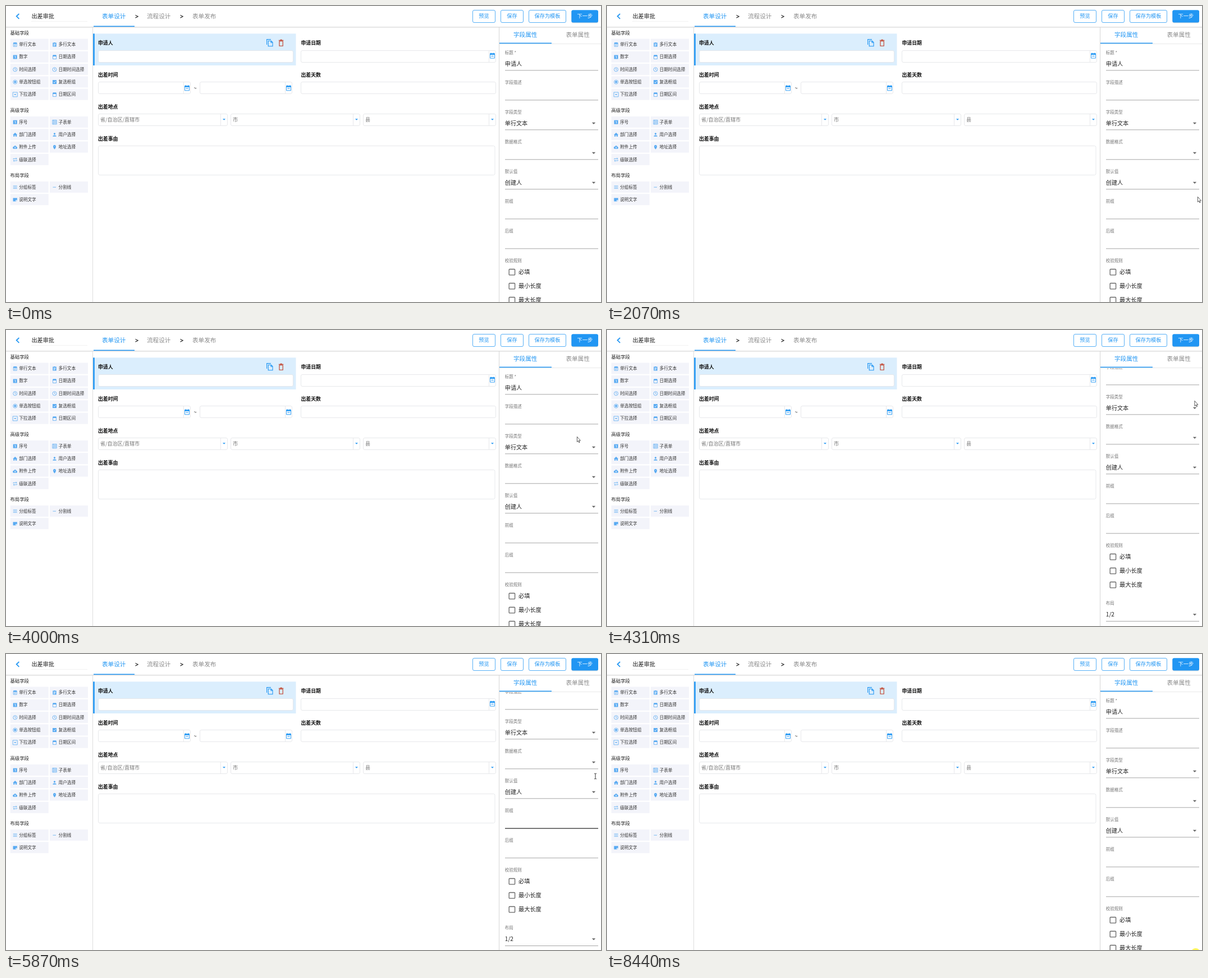
These frames come from a looping animation (1060x528 px, 8.52 s). An HTML page:

```html
<!DOCTYPE html>
<html lang="zh-CN">
<head>
<meta charset="utf-8">
<title>表单设计</title>
<style>
  html, body { margin: 0; width: 100%; height: 100%; overflow: hidden; background: #fff; }
  svg { display: block; width: 1060px; height: 528px; }
  text { font-family: "Noto Sans CJK SC", "Noto Sans CJK", "Noto Sans", sans-serif; white-space: pre; }
</style>
</head>
<body>
<svg id="stage" viewBox="0 0 1060 528"></svg>
<script>
const NS = 'http://www.w3.org/2000/svg';
const BLUE = '#2196f3', ICON = '#58aaf2', INK = '#222', GRAY = '#8c8c8c', EDGE = '#dfe1e5';
const HAIR = .75; // thickness of a thin line
const stage = document.getElementById('stage');

function add(parent, tag, attrs) {
  const el = document.createElementNS(NS, tag);
  for (const k in attrs) el.setAttribute(k, attrs[k]);
  parent.appendChild(el);
  return el;
}
const group = (parent, attrs = {}) => add(parent, 'g', attrs);
const box = (p, x, y, width, height, fill, more = {}) =>
  add(p, 'rect', { x, y, width, height, fill, ...more });
const path = (p, d, fill, more = {}) => add(p, 'path', { d, fill, ...more });
// Text placed by its vertical middle
function label(p, str, x, mid, size, fill = INK, more = {}) {
  add(p, 'text', { x, y: mid + size * 0.37, 'font-size': size, fill, ...more }).textContent = str;
}
const outline = (p, x, y, r, b, stroke = EDGE) =>
  box(p, x + .5, y + .5, r - x, b - y, '#fff', { stroke, 'stroke-width': HAIR, rx: 2.5 });
const triangle = (p, x, y, w, fill) =>
  path(p, `M${x - w} ${y - w / 2}h${2 * w}l${-w} ${w}z`, fill);

// Palette icons, drawn in an 8 x 8 cell
const line = d => g => path(g, d, 'none', { stroke: ICON });
const solid = (d, cut) => g => {
  path(g, d, ICON);
  if (cut) path(g, cut, 'none', { stroke: '#fff', 'stroke-width': .9 });
};
const both = (a, b) => g => { a(g); b(g); };
const frame = line('M1 1.5h6v6h-6z');
const ring = line('M.5 4a3.5 3.5 0 1 0 7 0a3.5 3.5 0 1 0 -7 0');
const calendar = both(frame, solid('M1 .6h1.2v-.6h1v.6h1.6v-.6h1v.6h1.2v2.4h-6z'));
const icons = {
  text: both(calendar, line('M2.5 4.5h3M2.5 6h2')),
  area: solid('M.8 .8h2l1.2-.8l1.2 .8h2v7h-6.4z', 'M2.2 3h3.6M2.2 4.6h3.6M2.2 6.2h2.4'),
  number: solid('M.5 .5h7v7h-7z', 'M3.2 2.4h1.2v3.8'),
  date: calendar,
  clock: both(ring, line('M4 1.8v2.4l1.7 1')),
  radio: both(ring, solid('M2 4a2 2 0 1 0 4 0a2 2 0 1 0 -4 0')),
  check: solid('M.5 .5h7v7h-7z', 'M1.8 4l1.6 1.6l2.9-3.1'),
  drop: both(line('M0 0h8v8h-8z'), solid('M2 3h4l-2 2.3z')),
  table: both(line('M.3 .3h7.4v7.4h-7.4z'), line('M2.2 .5v7M3 2.2h4M3 4h4M3 5.8h4')),
  home: solid('M4 .6L8 4.2H6.9V7.6H4.8V5H3.2V7.6H1.1V4.2H0z'),
  user: solid('M2.4 2.4a1.6 1.6 0 1 0 3.2 0a1.6 1.6 0 1 0 -3.2 0M.8 7.2c0-3 6.4-3 6.4 0z'),
  cloud: solid('M2 7a2 2 0 0 1-.2-4a2.5 2.5 0 0 1 4.7 .5a1.8 1.8 0 0 1 0 3.5z', 'M4 6.2v-2.4M2.9 4.8l1.1-1.1l1.1 1.1'),
  pin: solid('M4 8C-.4 2.8 2 .2 4 .2S8.4 2.8 4 8z', 'M3.6 2.7h.8'),
  loop: line('M.8 3.5v-1.3h6M5.4 .7l1.6 1.5l-1.6 1.5M7.2 4.6v1.3h-6M2.6 4.4l-1.6 1.5l1.6 1.5'),
  lines: line('M.5 1.7h7M.5 4h7M.5 6.3h7'),
  dash: line('M1 4h5.5'),
  note: solid('M.3 1h7.4v3.8l-2 2.2h-5.4z', 'M5.4 6.8v-1.9h2')
};

function drawHeader() {
  const g = group(stage);
  box(g, 0, 0, 1060, 37, '#fff');
  box(g, 0, 37, 1060, 1, '#dcdcdc');
  box(g, 0, 38, 1060, 1, '#f0f0f0');
  path(g, 'M23.3 13.8l-4.6 4.5l4.6 4.5', 'none', { stroke: BLUE, 'stroke-width': 1.8 });
  label(g, '出差审批', 45.5, 18, 10.1);
  box(g, 45, 27, 100, HAIR, '#eeeeee');
  label(g, '表单设计', 171, 18.5, 10.6, BLUE);
  label(g, '流程设计', 251, 18.5, 10.6, GRAY);
  label(g, '表单发布', 332, 18.5, 10.6, GRAY);
  for (const x of [230.5, 310.5])
    path(g, `M${x} 16.3l4.6 2.4l-4.6 2.4`, 'none', { stroke: '#333', 'stroke-width': 1.2 });
  box(g, 156, 35.5, 73, 1.5, BLUE);
  for (const [x, r, s] of [[831, 871, '预览'], [881, 921, '保存'], [931, 997, '保存为模板']]) {
    outline(g, x, 7, r, 29, BLUE);
    label(g, s, (x + r + 1) / 2, 18, 9.2, BLUE, { 'text-anchor': 'middle' });
  }
  box(g, 1007.3, 8.5, 47.7, 22, '#0002', { rx: 3 });
  box(g, 1007.3, 7.3, 47.7, 22.2, BLUE, { rx: 3 });
  label(g, '下一步', 1031.3, 18, 9.2, '#fff', { 'text-anchor': 'middle' });
}

function drawPalette() {
  const g = group(stage);
  box(g, 154, 38, 1, 490, '#dddddd');
  const sections = [
    ['基础字段', 47.5, 68.5, 'text 单行文本 area 多行文本 number 数字 date 日期选择 clock 时间选择 clock 日期时间选择 radio 单选按钮组 check 复选框组 drop 下拉选择 date 日期区间'],
    ['高级字段', 185.5, 207, 'number 序号 table 子表单 home 部门选择 user 用户选择 cloud 附件上传 pin 地址选择 loop 级联选择'],
    ['布局字段', 301.5, 323, 'lines 分组标签 dash 分割线 note 说明文字']
  ];
  for (const [title, titleY, top, list] of sections) {
    label(g, title, 7.5, titleY, 8.4);
    const words = list.split(' ');
    for (let i = 0; i < words.length / 2; i++) {
      const x = i % 2 ? 78 : 7.7, y = top + (i >> 1) * 22.3;
      box(g, x, y - 10, 68, 20, '#f3f4fa');
      icons[words[2 * i]](group(g, { transform: `translate(${x + 4.5} ${y - 3.8})`, 'stroke-width': .8 }));
      label(g, words[2 * i + 1], x + 15.5, y - .2, 7.65, '#333');
    }
  }
}

function dateIcon(g, x, y) {
  path(g, `M${x - 4} ${y - 3.5}h8v8h-8z`, 'none', { stroke: BLUE, 'stroke-width': .9 });
  path(g, `M${x - 4.4} ${y - 4}h8.8v2.5h-8.8zM${x - 3} ${y - 5}h1v2h-1zM${x + 2} ${y - 5}h1v2h-1z`, BLUE);
  box(g, x - 2.2, y + .2, 4.4, 1, BLUE);
}

// Form rows that light up under the pointer: x, y, right, bottom
const rows = [[516, 49, 878, 106], [155, 106, 516, 163], [516, 106, 878, 163], [155, 163, 878, 220], [155, 220, 878, 308]];
let rowGlow;

function drawForm() {
  const g = group(stage);
  rowGlow = box(g, 0, 0, 0, 0, '#f0f8fe');
  box(g, 155, 49.3, 361.5, 56.7, '#dbeefd');
  box(g, 155.2, 49.3, 2.6, 56.7, BLUE);
  const titles = [['申请人', 164, 66], ['申请日期', 525.5, 66], ['出差时间', 164, 123], ['出差天数', 525.5, 123], ['出差地点', 164, 180], ['出差事由', 164, 237]];
  for (const [s, x, y] of titles) label(g, s, x, y, 8.9, '#111', { 'font-weight': 700 });

  path(g, 'M464.6 69v-9.4h7.4M467.2 62.2h5.2l2.6 2.6v7h-7.8zM472 62.4v2.8h2.8', 'none', { stroke: BLUE, 'stroke-width': 1.1 });
  path(g, 'M487 62.8h6.2v8.4h-6.2zM485.8 61.2h8.6M488.6 60.3h3', 'none', { stroke: '#c0391f', 'stroke-width': 1.1 });

  const field = (x, y, r, split) => {
    outline(g, x, y, r, y + 21);
    if (split) box(g, split, y + 1, HAIR, 20, EDGE);
  };
  field(164, 79, 511);
  field(525, 79, 872, 860);
  field(164, 135, 328, 316);
  field(345, 135, 509, 497);
  field(525, 135, 872);
  dateIcon(g, 866.5, 88.6);
  dateIcon(g, 322.5, 146.3);
  dateIcon(g, 503.5, 146.3);
  label(g, '~', 334.5, 147, 9);
  for (const [x, r, s] of [[164, 394, '省/自治区/直辖市'], [400, 630, '市'], [636, 872, '县']]) {
    field(x, 192, r, r - 12);
    label(g, s, x + 4, 203, 9, '#757575');
    triangle(g, r - 5.5, 202.6, 2.5, BLUE);
  }
  outline(g, 164, 249, 870.5, 301);
}

// Underlines of the property slots share one pitch
const PITCH = 53, UNDER = 114.5;
let panel, lineGlow;

function drawPanel() {
  add(add(stage, 'clipPath', { id: 'view' }), 'rect', { x: 879, y: 68, width: 181, height: 460 });
  box(stage, 878, 38, 1, 490, '#d6d6d6');
  panel = group(group(stage, { 'clip-path': 'url(#view)' }));
  const g = panel, DIM = '#757575';
  const slots = [['标题 *', '申请人'], ['字段描述'], ['字段类型', '单行文本', 1], ['数据格式', '', 1], ['默认值', '创建人', 1], ['前缀'], ['后缀']];
  const slot = ([name, value, isSelect], y) => {
    label(g, name, 888.8, y, 7.5, DIM);
    if (value) label(g, value, 888.8, y + 20, 10.1);
    if (isSelect) triangle(g, 1047, y + 20.4, 3.2, '#666');
    box(g, 889, y + UNDER - 83, 166, HAIR, '#888');
  };
  slots.forEach((s, i) => slot(s, 83 + PITCH * i));
  label(g, '校验规则', 888.8, 454, 7.5, DIM);
  ['必填', '最小长度', '最大长度'].forEach((s, i) => {
    const y = 474.7 + 25 * i;
    box(g, 896.2, y - 5.2, 10.4, 10.4, '#fff', { stroke: '#666', 'stroke-width': 1.3, rx: 1 });
    label(g, s, 913, y, 10.2);
  });
  slot(['布局', '1/2', 1], 557.5);
  label(g, '是否作为待办标题', 888.8, 610, 7.5, DIM);
  const radio = (x, s, color) => {
    add(g, 'circle', { cx: x, cy: 630.5, r: 4.7, fill: '#fff', stroke: color, 'stroke-width': 1.2 });
    label(g, s, x + 12.6, 630.5, 10.2);
  };
  radio(894.3, '是', '#666');
  radio(934.3, '否', BLUE);
  add(g, 'circle', { cx: 934.3, cy: 630.5, r: 2.6, fill: BLUE });
  lineGlow = box(g, 889, 0, 166, 1.4, '#555');

  box(stage, 879, 67, 181, HAIR, '#e0e0e0');
  label(stage, '字段属性', 904, 51.3, 10.6, BLUE);
  label(stage, '表单属性', 997.5, 51.3, 10.6, GRAY);
  box(stage, 879, 65.6, 93, 1.5, BLUE);
}

drawHeader();
drawPalette();
drawForm();
drawPanel();

const spot = add(stage, 'circle', { cx: 1048.7, cy: 533.6, r: 8.8, fill: '#fdf65c' });
const pen = { stroke: '#333', 'stroke-width': .8, 'stroke-linejoin': 'round' };
const pointer = group(stage);
const shapes = {
  arrow: path(pointer, 'M.4 .4V9.6L2.5 7.7L3.8 10.9L5.1 10.3L3.8 7.2H6.4Z', '#fff', pen),
  beam: path(pointer, 'M-2 -4.8h1.4l.6 .6l.6 -.6h1.4M0 -4.4v8.8M-2 4.8h1.4l.6 -.6l.6 .6h1.4', 'none', { stroke: '#333' }),
  hand: path(pointer, 'M-.8 8V1a.9 .9 0 0 1 1.8 0V5l4 .8q1 .4 .9 1.6l-.8 5.2h-5L-3 8.2q.6-1.4 2.2-.2z', '#fff', pen)
};

// Bursts of movement: first change, last change, number of changes
const LOOP = 8520;
const bursts = [[0, 0, 1], [210, 1050, 12], [1130, 1200, 2], [1370, 1760, 6], [2070, 2470, 6], [2910, 3690, 11],
  [3770, 4410, 9], [4620, 4770, 3], [5080, 5240, 3], [5790, 6020, 4], [6480, 7190, 10]];
const trail = [
  [0, 1090, 560], [210, 1052, 520], [1050, 0, 72],
  [1130, 1, 18], [1200, -30, 16],
  [1370, 0, 16], [1682, 843, 230], [1760, 1080, 290],
  [2070, 1052, 340], [2230, 165, 232], [2470, 722, 267],
  [2910, 537, 217], [3222, 2, 10], [3690, 457, 61],
  [3930, 1017, 190], [4090, 1040, 170], [4410, 1053, 82],
  [4620, 1053, 120], [4770, 1051, 216],
  [5080, 1050, 218], [6020, 1050, 218],
  [6480, 1040, 130], [6637, 990, 58], [7111, 46, 1], [7190, -30, -30]
];
const scrolls = [[0, 0], [4090, 0], [4410, 139], [5713, 139], [6020, 0]];
const looks = [[0, 'arrow'], [5080, 'beam'], [6480, 'hand'], [6715, 'arrow']];
const lines = [[0, -1], [4620, 4], [4770, -1], [5080, 5], [6480, -1]];

const last = (list, t) => list.filter(k => k[0] <= t).pop();

function snap(t) {
  const [from, to, n] = last(bursts, t);
  if (n < 2) return from;
  const d = (to - from) / (n - 1);
  return from + d * Math.min(n - 1, Math.floor((t - from) / d + .01));
}
function blend(list, t, col) {
  const a = last(list, t), b = list[list.indexOf(a) + 1];
  return b ? a[col] + (b[col] - a[col]) * (t - a[0]) / (b[0] - a[0]) : a[col];
}

function draw(now) {
  const t = now % LOOP, s = snap(t);
  const x = blend(trail, s, 1), y = blend(trail, s, 2);
  pointer.setAttribute('transform', `translate(${x} ${y})`);
  const look = last(looks, t)[1];
  for (const k in shapes) shapes[k].style.display = k === look ? '' : 'none';

  const row = rows.find(([l, top, r, b]) => x >= l && x < r && y + 4 >= top && y + 4 < b);
  rowGlow.style.display = row ? '' : 'none';
  if (row) {
    const [l, top, r, b] = row;
    for (const [k, v] of [['x', l], ['y', top], ['width', r - l], ['height', b - top]]) rowGlow.setAttribute(k, v);
  }

  panel.setAttribute('transform', `translate(0 ${-Math.round(blend(scrolls, s, 1))})`);
  const i = last(lines, t)[1];
  lineGlow.style.display = i < 0 ? 'none' : '';
  lineGlow.setAttribute('y', UNDER + PITCH * i);
  spot.style.display = t >= 8440 ? '' : 'none';
}

const begin = performance.now();
function tick() {
  draw(performance.now() - begin);
  requestAnimationFrame(tick);
}
tick();
</script>
</body>
</html>
```
